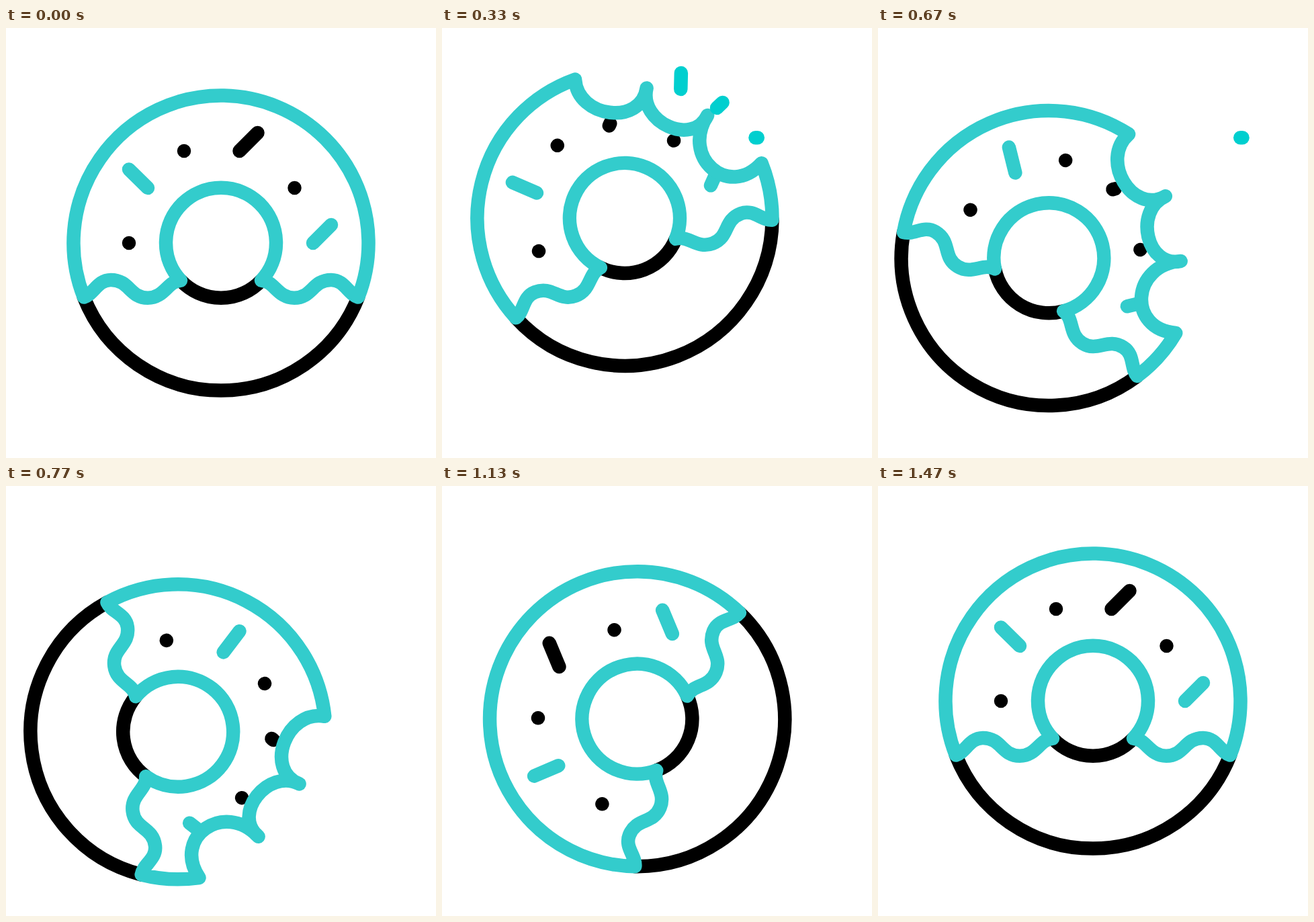
An HTML page that plays this animation: 640 by 640 pixels, repeating every 2 s.

```html
<!DOCTYPE html>
<html lang="en">
<head>
<meta charset="utf-8">
<title>Donut</title>
<style>
  html, body { margin: 0; width: 100%; height: 100%; overflow: hidden; background: #fff; }
  svg { display: block; width: 100vw; height: 100vh; }
  .line { fill: none; stroke-width: 20.5; stroke-linecap: round; stroke-linejoin: round; }
  .teal { stroke: #33cccc; }
  .dark { stroke: #000; }
  .crumb { stroke: #00cfcf; }
</style>
</head>
<body>
<svg viewBox="0 0 640 640">
  <g id="donut">
    <path class="line dark" d="M-204.2 80.6A219.5 219.5 0 0 0 204.2 80.6M-60 55.7A82 82 0 0 0 60 55.7"/>
    <path class="line teal" d="M-137-109.5l28 27.5M137 0l27-27"/>
    <path class="line dark" d="M-55-137h.01M109.5-82h.01M-137 0h.01"/>
    <path id="stick" class="line dark"/>
    <path id="gap" fill="#fff"/>
    <path id="icing" class="line teal"/>
  </g>
  <g id="crumbs"></g>
</svg>
<script>
const LOOP = 2000, LAST = 44;
const BITE_ON = 7, BITE_OFF = 30;
const R = 219.5;
const $ = id => document.getElementById(id);

// Tooth marks: four tips a fixed angle apart, the middle two set in from the rim
function tip(i) {
  const a = (271.2 + 29.25 * i) * Math.PI / 180;
  const r = i % 3 ? 196.5 : R;
  return [r * Math.cos(a), r * Math.sin(a)];
}

// One scallop between neighbouring tips, bulging towards the centre
function scallop(i, depth) {
  const [ax, ay] = tip(i), [bx, by] = tip(i + 1);
  const dx = bx - ax, dy = by - ay;
  const at = (u, d) => `${ax + dx * u - dy * d} ${ay + dy * u + dx * d} `;
  return "C" + at(.1, depth) + at(.99, depth) + at(1, 0);
}

const bite = [.53, .52, .68].map((depth, i) => scallop(i, depth)).join("");
const rim = p => `A${R} ${R} 0 0 1 ${p} `;
const wave = "C189 76 184 55 164 55C136 55 136 81.7 109 81.7C84 81.7 80 57 60 55.7";
const waveBack = "C-80 57-84 81.7-109 81.7C-136 81.7-136 55-164 55C-184 55-189 76-204.2 80.6Z";
const icing = edge => "M-204.2 80.6" + rim(tip(0)) + edge + rim("204.2 80.6") +
  wave + "A82 82 0 1 0-60 55.7" + waveBack;
const whole = icing(rim(tip(3)));
const bitten = icing(bite);
const gap = `M${tip(0)}${bite}H270V-270H0Z`;

// Poses: [step, x, y, turn]
const poses = [
  [0, 320, 320, 0], [10, 272, 283.2, -20.9], [17, 255.8, 315.2, -7.2], [23, 256, 365.8, 82.8],
  [29, 270, 363.4, 199.9], [38, 306.5, 332, 344.7], [44, 320, 320, 360]
];

const rate = (i, c) => (poses[i + 1][c] - poses[i][c]) / (poses[i + 1][0] - poses[i][0]);

// Slope of the smooth curve through three neighbouring poses; at rest at both ends
function slope(i, c) {
  if (i === 0 || i === poses.length - 1) return 0;
  const before = poses[i][0] - poses[i - 1][0], after = poses[i + 1][0] - poses[i][0];
  return (rate(i - 1, c) * after + rate(i, c) * before) / (before + after);
}

function pose(k, c) {
  let i = 0;
  while (i < poses.length - 2 && k >= poses[i + 1][0]) i++;
  const p = poses[i], q = poses[i + 1];
  const d = q[0] - p[0], u = (k - p[0]) / d, w = 1 - u;
  return p[c] * w * w * (1 + 2 * u) + q[c] * u * u * (3 - 2 * u) +
    d * u * w * (slope(i, c) * w - slope(i + 1, c) * u);
}

function ease(u) {
  u = Math.max(0, Math.min(1, u));
  return u * u * (3 - 2 * u);
}

// Flying crumbs: start x, y, then travel dx, dy
const crumbs = [[355.3, 91, 1.8, -76], [409, 119, 55, -52], [466.5, 163.3, 76, 0]].map(line => {
  const el = document.createElementNS("http://www.w3.org/2000/svg", "path");
  el.setAttribute("class", "line crumb");
  $("crumbs").appendChild(el);
  return { el, line };
});

function drawCrumb({ el, line: [x, y, dx, dy] }, i, k) {
  const head = ease((k - 7 - i) / 8), tail = ease((k - 11 - i) / 8);
  const at = u => (x + dx * u).toFixed(2) + " " + (y + dy * u).toFixed(2);
  el.setAttribute("d", head > tail ? "M" + at(tail) + "L" + at(head) : "");
}

function draw(ms) {
  // Thirty steps a second on a 10 ms clock, then a rest
  const k = Math.min(LAST, Math.floor((Math.floor(ms / 10) * 3 + 1) / 10));
  const isBitten = k >= BITE_ON && k < BITE_OFF;
  const stick = isBitten ? 2.5 : 27;
  $("donut").setAttribute("transform",
    `translate(${pose(k, 1)} ${pose(k, 2)}) rotate(${pose(k, 3)})`);
  $("stick").setAttribute("d", `M27.5-137l${stick} ${-stick}`);
  $("icing").setAttribute("d", isBitten ? bitten : whole);
  $("gap").setAttribute("d", isBitten ? gap : "");
  crumbs.forEach((c, i) => drawCrumb(c, i, k));
}

let start;
function tick(now) {
  if (start === undefined) start = now;
  draw((now - start) % LOOP);
  requestAnimationFrame(tick);
}
draw(0);
requestAnimationFrame(tick);
</script>
</body>
</html>
```
